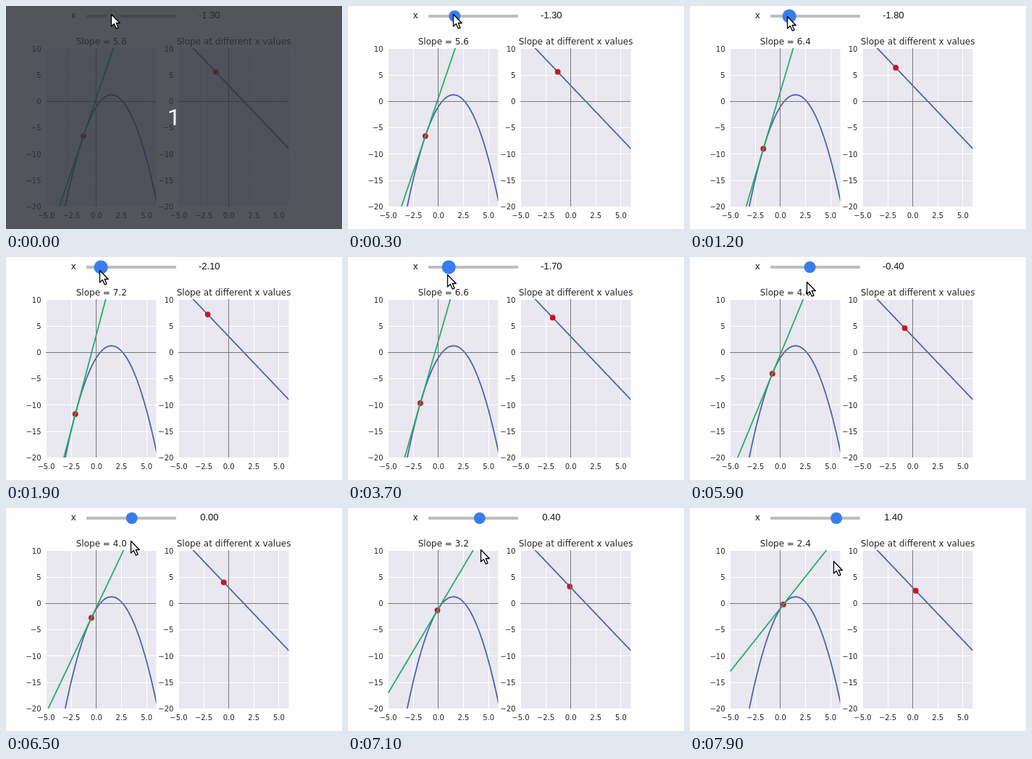
Recreate the animation shown at these times as an HTML page. Size 464 by 307 pixels, loop 8000 ms.

```html
<!DOCTYPE html>
<html lang="en">
<head>
<meta charset="utf-8">
<title>Slope explorer</title>
<style>
  html, body { margin: 0; width: 100%; height: 100%; overflow: hidden; background: #fefefe; }
  svg { display: block; width: 464px; height: 307px; }
  text { font-family: "DejaVu Sans", sans-serif; font-size: 10px; fill: #262626; text-anchor: middle; }
  .title { font-size: 12px; }
  .tick-y { text-anchor: end; }
  .ui { font: 13px "Liberation Sans", Arial, sans-serif; fill: #111; }
  .panel { fill: #e9e7ef; }
  .grid { stroke: #fff; stroke-width: 1; }
  .axis { stroke: #777; stroke-width: 1; }
  .curve, .tangent { fill: none; stroke: #4a60aa; stroke-width: 1.75; }
  .tangent { stroke: #1fae68; }
  .dot { fill: #cc1420; }
  .count { font: 32px Roboto, sans-serif; fill: #fff; }
  #knob { fill: #387dec; }
  .waiting #knob { fill: #fefefe; stroke: #bdbdbd; }
  #stage:not(.waiting) #veil { display: none; }
</style>
</head>
<body>
<svg id="stage" viewBox="0 0 464 307">
  <text class="ui" x="93.3" y="17">x</text>
  <text class="ui" id="value" x="280.8" y="17"></text>
  <rect x="111" y="12" width="124" height="4" rx="1" fill="#bdbdbd"/>
  <circle id="knob" cy="14"/>
  <g id="plots"></g>
  <g id="veil">
    <rect width="464" height="307" fill="rgb(44,48,57)" fill-opacity=".82"/>
    <text class="count" x="232" y="164">1</text>
  </g>
  <path id="cursor" d="M0 0V16.5L3.8 13L6.8 19.6L9.6 18.4L6.7 12H11.8Z"
        fill="#fff" stroke="#000" stroke-width="1.3" stroke-linejoin="round"/>
</svg>
<script>
const LOOP = 8000, STEP = 100;
const TOP = 58.8, UNIT_X = 13.85, UNIT_Y = 7.25, WIDTH = 11 * UNIT_X, HEIGHT = 30 * UNIT_Y;
const byId = id => document.getElementById(id);

const f = x => -x * x + 3 * x - 1;
const slope = x => 3 - 2 * x;
const py = y => TOP + (10 - y) * UNIT_Y;

// key points as time: value, joined by straight lines
const SLIDER = { 500: -1.3, 1600: -2.1, 2900: -2.1, 3500: -1.7, 4000: -1.7, 5900: -0.4, 7100: 0.4, 7900: 1.4 };
const PLOTTED = { 500: -1.3, 1900: -2.1, 3100: -2.1, 3800: -1.7, 4200: -1.7, 5900: -0.8, 7900: 0.3 };
const POINTER_X = { 500: 145, 1600: 129, 2900: 129, 3500: 137, 4000: 137, 5900: 161, 7900: 198 };
const POINTER_Y = { 500: 11, 1900: 18, 2900: 18, 3500: 24, 4000: 24, 5900: 34, 7900: 73 };

function at(track, t) {
  const times = Object.keys(track).map(Number);
  const i = times.findIndex(k => k >= t);
  if (i < 0) return track[times.at(-1)];
  if (i === 0) return track[times[0]];
  const a = times[i - 1], b = times[i];
  return track[a] + (track[b] - track[a]) * (t - a) / (b - a);
}

function set(el, attrs) {
  for (const k in attrs) el.setAttribute(k, attrs[k]);
  return el;
}

function add(parent, tag, attrs, text = "") {
  const el = document.createElementNS("http://www.w3.org/2000/svg", tag);
  el.textContent = text;
  return parent.appendChild(set(el, attrs));
}

const label = (n, digits) => n.toFixed(digits).replace("-", "\u2212");
const crisp = n => Math.floor(n) + 0.5;
const tenths = n => Math.round(n * 10 + 1e-6) / 10 || 0;

function makePlot(left, title, fn) {
  const root = byId("plots");
  const px = x => left + (x + 5) * UNIT_X;
  const id = "clip" + Math.floor(left);
  const box = { x: Math.floor(left), y: Math.floor(TOP), width: WIDTH, height: HEIGHT + 0.5 };
  add(add(root, "clipPath", { id }), "rect", box);
  add(root, "rect", { ...box, class: "panel" });
  const area = add(root, "g", { "clip-path": `url(#${id})` });

  const vline = (x, cls) => add(area, "line",
    { class: cls, x1: crisp(px(x)), x2: crisp(px(x)), y1: 0, y2: 307 });
  const hline = (y, cls) => add(area, "line",
    { class: cls, x1: 0, x2: 464, y1: crisp(py(y)), y2: crisp(py(y)) });

  for (let x = -5; x <= 5; x += 2.5) {
    vline(x, "grid");
    add(root, "text", { x: px(x), y: 292 }, label(x, 1));
  }
  for (let y = -20; y <= 10; y += 5) {
    hline(y, "grid");
    add(root, "text", { class: "tick-y", x: left - 7, y: Math.round(py(y) + 3.8) }, label(y, 0));
  }

  const points = [];
  for (let x = -5; x <= 6.01; x += 0.1) points.push(px(x) + "," + py(fn(x)));
  add(area, "polyline", { class: "curve", points: points.join(" ") });
  const dot = add(area, "circle", { class: "dot", r: 3.9 });
  const tangent = add(area, "line", { class: "tangent" });
  vline(0, "axis");
  hline(0, "axis");
  const heading = add(root, "text", { class: "title", x: left + WIDTH / 2, y: 53 }, title);

  const moveDot = a => set(dot, { cx: px(a), cy: py(fn(a)) });
  const moveTangent = a => {
    const y = x => py(fn(a) + slope(a) * (x - a));
    set(tangent, { x1: px(-5), y1: y(-5), x2: px(6), y2: y(6) });
  };
  return { heading, moveDot, moveTangent };
}

const main = makePlot(55.6, "Slope", f);
const side = makePlot(238.4, "Slope at different x values", slope);

function draw(t) {
  const value = tenths(at(SLIDER, t));
  const a = tenths(at(PLOTTED, t));
  const dragging = t >= 600 && t < 5500;

  byId("stage").classList.toggle("waiting", t < 300);
  byId("value").textContent = value.toFixed(2);
  set(byId("knob"), { cx: 147.3 + (value + 1.3) * 20.3, r: dragging ? 9.6 : 8 });
  const x = crisp(at(POINTER_X, t)), y = crisp(at(POINTER_Y, t));
  set(byId("cursor"), { transform: `translate(${x} ${y})` });

  main.heading.textContent = "Slope = " + slope(a).toFixed(1);
  main.moveDot(a);
  main.moveTangent(a);
  side.moveDot(a);
}

let start;
function tick(now) {
  start ??= now;
  draw(Math.floor((now - start) % LOOP / STEP) * STEP);
  requestAnimationFrame(tick);
}
draw(0);
requestAnimationFrame(tick);
</script>
</body>
</html>
```
